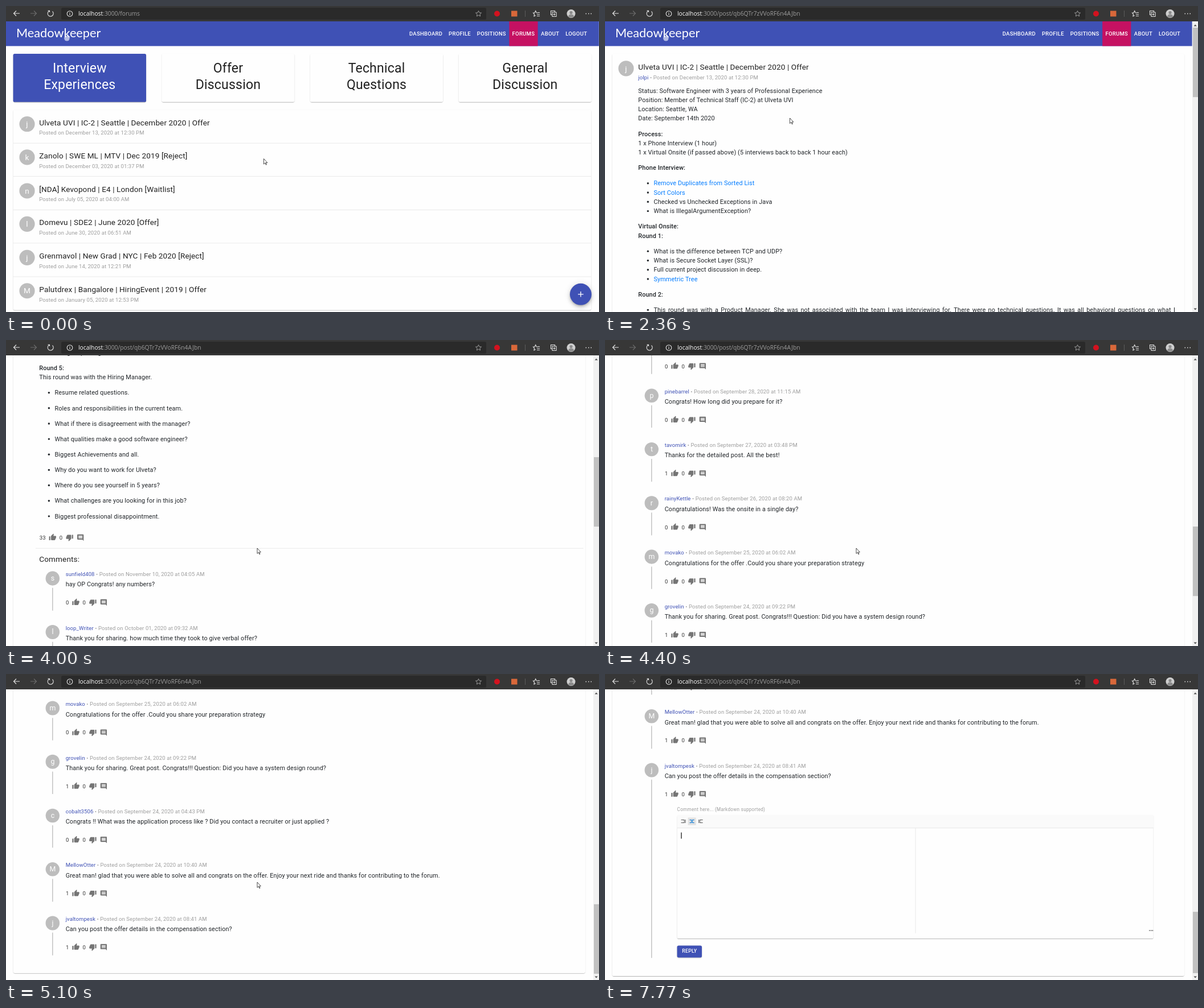
These frames come from a looping animation (1041x538 px, 8000 ms). An HTML page:

```html
<!DOCTYPE html>
<html lang="en">
<head>
<meta charset="utf-8">
<title>Forum walkthrough</title>
<style>
  html, body { margin: 0; width: 100%; height: 100%; overflow: hidden; background: #fefefe; }
  body { position: relative; font-family: Roboto, sans-serif; }
  #view { position: absolute; left: 0; top: 27px; width: 1041px; height: 511px; overflow: hidden; }
  /* The page is laid out 1535px wide and scaled down to the stage. */
  #page { position: absolute; left: -.6px; width: 1535px; transform-origin: 0 0; color: rgba(0,0,0,.87); }
  #chrome, #bar, #pointer { position: absolute; left: 0; top: 0; }
  .at { position: absolute; line-height: 24px; white-space: nowrap; }
  .card { position: absolute; background: #fefefe; border-radius: 4px;
    box-shadow: 0 2px 1px -1px rgba(0,0,0,.2), 0 1px 1px rgba(0,0,0,.14), 0 1px 3px rgba(0,0,0,.08); }
  .h6 { font-size: 20px; letter-spacing: .0075em; }
  .small { font-size: 14px; letter-spacing: .01071em; color: #9e9e9e; }
  .small b { font-weight: 400; color: #3f51b5; }
  .body { font-size: 16px; letter-spacing: .00938em; color: #212529; }
  .count { width: 17.5px; text-align: right; color: #333; }
  .avatar { position: absolute; border-radius: 50%; background: #bdbdbd; color: #fff; text-align: center; }
  .icon { position: absolute; width: 20px; height: 20px; fill: #757575; }
  .rule { position: absolute; height: 1px; background: #e0e0e0; }
  .thread { position: absolute; left: 120.7px; width: 2.4px; background: #bdbdbd; }

  nav { position: absolute; left: 0; top: 0; height: 64px; background: #3f51b5; color: #fff; }
  nav .menu { position: absolute; right: 22.4px; top: 0; display: flex; }
  nav .menu span { padding: 0 8px; line-height: 64px; font-size: 14px; font-weight: 500; letter-spacing: .02857em; }
  nav .menu .on { background: #c51162; }
  nav .mark { position: absolute; left: 152px; top: 37px; width: 14px; height: 14px; border-radius: 50%; background: #b4bce4; }
  nav .brand { position: absolute; left: 28px; top: 9px; font: 400 32px/40px Lato, sans-serif; }

  .topic { top: 84px; width: 344px; height: 125px; box-sizing: border-box; padding-top: 16px;
    font-size: 34px; line-height: 42px; letter-spacing: .00735em; text-align: center; }
  .topic.on { background: #3f51b5; color: #fff; }
  .fab { position: absolute; left: 1460.4px; top: 679px; width: 56px; height: 56px; border-radius: 50%; background: #3f51b5;
    box-shadow: 0 3px 5px -1px rgba(0,0,0,.2), 0 6px 10px rgba(0,0,0,.14), 0 1px 18px rgba(0,0,0,.12); }
  .fab svg { position: absolute; left: 16px; top: 16px; fill: #fff; }

  #spinner { position: absolute; left: 692.5px; top: 339px; width: 150px; height: 150px; fill: none; stroke: #3f51b5; stroke-width: 3.6;
    animation: turn 1.4s linear calc(var(--spin) * -1ms) infinite paused; }
  #spinner circle { animation: dash 1.4s ease-in-out calc(var(--spin) * -1ms) infinite paused; }
  @keyframes turn { to { transform: rotate(360deg); } }
  @keyframes dash {
    0% { stroke-dasharray: 1 200; stroke-dashoffset: 0; }
    50% { stroke-dasharray: 100 200; stroke-dashoffset: -15; }
    100% { stroke-dasharray: 100 200; stroke-dashoffset: -125; }
  }

  #story { position: absolute; left: 87.4px; top: 168px; width: 1389px; line-height: 24px; text-align: justify; }
  #story p { margin: 0 0 16px; }
  #story ul { margin: 0 0 16px; padding-left: 40px; }
  #story b { font-weight: 500; }
  #story a { color: #007bff; }

  #editor .box { left: 188px; top: 2982px; width: 1232px; height: 320px; }
  #editor .tools { position: absolute; left: 0; top: 0; width: 100%; height: 34px; box-sizing: border-box;
    background: #fafafa; border-bottom: 1px solid #ddd; }
  #editor .split { position: absolute; left: 616px; top: 34px; width: 1px; height: 272px; background: #ddd; }
  #editor .label { font-size: 12px; letter-spacing: .0333em; color: #9e9e9e; }
  #editor .reply { position: absolute; left: 188px; top: 3320px; width: 64px; line-height: 30.5px; border-radius: 4px; text-align: center;
    background: #3f51b5; color: #fff; font-size: 13px; font-weight: 500; letter-spacing: .02857em;
    box-shadow: 0 1px 3px rgba(0,0,0,.25); }
  #caret { position: absolute; left: 10.2px; top: 44.5px; width: 1.5px; height: 16px; background: #222; }
  #url { font: 10.3px "Open Sans", "Noto Sans", sans-serif; fill: #9d9d9d; }
</style>
</head>
<body>
<div id="view"><div id="page">
  <nav>
    <i class="mark"></i><span class="brand">Meadowkeeper</span>
    <div class="menu"><span>DASHBOARD</span><span>PROFILE</span><span>POSITIONS</span><span class="on">FORUMS</span><span>ABOUT</span><span>LOGOUT</span></div>
  </nav>
  <section id="forum"></section>
  <svg id="spinner" viewBox="22 22 44 44"><circle cx="44" cy="44" r="20.2"/></svg>
  <article id="post">
    <div id="sheet" class="card" style="left:20px;top:84px;width:1480px"></div>
    <div id="story" class="body">
      <p>Status: Software Engineer with 3 years of Professional Experience<br>Position: Member of Technical Staff (IC-2) at Ulveta UVI<br>Location: Seattle, WA<br>Date: September 14th 2020</p>
      <p><b>Process:</b><br>1 x Phone Interview (1 hour)<br>1 x Virtual Onsite (if passed above) (5 interviews back to back 1 hour each)</p>
      <p><b>Phone Interview:</b></p>
      <ul><li><a>Remove Duplicates from Sorted List</a></li><li><a>Sort Colors</a></li><li>Checked vs Unchecked Exceptions in Java</li><li>What is IllegalArgumentException?</li></ul>
      <p><b>Virtual Onsite:</b><br><b>Round 1:</b></p>
      <ul><li>What is the difference between TCP and UDP?</li><li>What is Secure Socket Layer (SSL)?</li><li>Full current project discussion in deep.</li><li><a>Symmetric Tree</a></li></ul>
      <p><b>Round 2:</b></p>
      <ul><li>This round was with a Product Manager. She was not associated with the team I was interviewing for. There were no technical questions. It was all behavioral questions on what I performed&nbsp;at&nbsp;my previous and current workplaces.</li></ul>
      <p><b>Round 3:</b></p>
      <ul><li>What is the difference between a process and a thread?</li><li>How does a hash map work?</li><li><a>Merge Intervals</a></li></ul>
      <p><b>Round 4:</b></p>
      <ul><li>Discussion about the past projects.</li><li><a>Valid Parentheses</a></li><li>Design a parking lot.</li></ul>
      <p><b>Round 5:</b><br>This round was with the Hiring Manager.</p>
      <ul id="last"></ul>
    </div>
    <div id="thread"></div>
    <div id="editor">
      <div class="at label" style="left:188px;top:2956px">Comment here... (Markdown supported)</div>
      <div class="card box">
        <div class="tools"></div><div class="split"></div>
        <svg style="position:absolute;left:0;top:0" width="88.5" height="34" viewBox="0 0 60 23" fill="none" stroke="#555">
          <path fill="#e2e2e2" stroke="none" d="M19 4.500h14v13H19z"/>
          <path d="M7 8.500h5.500v5H7M14.500 8v6M38 8v6M45 8.500h-5v5h5"/>
          <path stroke="#0078d7" d="M22 8.500h3v5h-3M30 8.500h-3v5h3"/>
        </svg>
        <div id="caret"></div>
        <svg style="position:absolute;left:1220px;top:297px" width="12" height="4" fill="#333"><path d="M1 1h2v2H1zM5 1h2v2H5zM9 1h2v2H9z"/></svg>
      </div>
      <div class="reply">REPLY</div>
    </div>
  </article>
</div></div>

<svg id="bar" width="1041" height="538">
  <path fill="#f1f1f1" d="M1031 27h10v511h-10z"/>
  <path fill="#505050" d="M1033.500 35.500l2.700-3 2.700 3zM1033.500 531.500l2.700 3 2.700-3z"/>
  <rect id="thumb" x="1032" width="9" fill="#c1c1c1"/>
</svg>

<svg id="chrome" width="1041" height="27" fill="none" stroke="#e4e4e4" stroke-width="1.1">
  <path fill="#373737" stroke="none" d="M0 0h1041v27H0z"/>
  <rect x="97" y="3" width="746" height="21" rx="2.500" fill="#2a2a2a" stroke="none"/>
  <path d="M24 13H13.500M18 8.500L13.500 13l4.500 4.500"/>
  <path stroke="#6c6c6c" d="M43 13h10.500M49 8.500l4.500 4.500-4.500 4.500"/>
  <path d="M81.500 9.500A5 5 0 1 1 76 8.700M73.500 8.200H76.500V11"/>
  <circle cx="112" cy="13.500" r="4.800"/><path d="M112 12.500v3.500M112 10.500v1"/>
  <text id="url" x="127" y="17.200" stroke="none"><tspan fill="#fff">localhost</tspan><tspan id="path"></tspan></text>
  <path stroke="#a8a8a8" stroke-width=".9" d="M829.500 8.500l1.500 3.200 3.500.4-2.600 2.400.7 3.500-3.100-1.800-3.100 1.800.7-3.500-2.600-2.400 3.500-.4z"/>
  <circle cx="862" cy="13.500" r="5" fill="#d3121f" stroke="none"/>
  <path fill="#d9683a" stroke="none" d="M887 8.500h10.500v10H887z"/>
  <path stroke="#5a5a5a" d="M911.500 8v11"/>
  <path d="M933 12l-1.800-.2-1.500-3.200-1.500 3.200-2.700.4 2 2.200-.5 3.500 2.700-1.500M933 11.500h4M932 14.500h5M932 17.500h5"/>
  <path d="M958.500 15.500h-2v-7h7v2M959 11h7v7.500h-7zM962.500 12.700v4M960.500 14.700h4"/>
  <circle cx="992" cy="13.500" r="7.500" fill="#cfcfcf" stroke="none"/>
  <path fill="#8b8b8b" stroke="none" d="M987 18.500a5 4 0 0 1 10 0 7.500 7.500 0 0 1-10 0z"/><circle cx="992" cy="11.500" r="2.600" fill="#8b8b8b" stroke="none"/>
  <path stroke-width="1.500" d="M1017.500 13.500h1.500M1022 13.500h1.500M1026.500 13.500h1.500"/>
</svg>

<svg id="pointer" width="1041" height="538"><g id="arrow">
  <circle id="press" cx=".5" cy="0" r="8.300" fill="#ff0" fill-opacity=".47"/>
  <path fill="#fff" stroke="#222" stroke-width=".8" d="M0 0V9.500L2.300 7.400 3.800 10.800 5 10.300 3.600 7H6.400Z"/>
</g></svg>

<script>
const $ = id => document.getElementById(id);
const SCALE = .6787, LOOP = 8000, VIEW = 511;

// Page building
const at = (x, y, cls, html) => `<div class="at ${cls}" style="left:${x}px;top:${y - 12}px">${html}</div>`;
const avatar = (x, y, d, letter) =>
  `<div class="avatar" style="left:${x - d / 2}px;top:${y - d / 2}px;width:${d}px;height:${d}px;font-size:${d / 2}px;line-height:${d}px">${letter}</div>`;
const rule = (x, y, w) => `<div class="rule" style="left:${x}px;top:${y}px;width:${w}px"></div>`;
const THUMB = "M1 21h4V9H1v12zm22-11c0-1.100-.9-2-2-2h-6.310l.95-4.570.03-.32c0-.41-.17-.79-.44-1.060L14.170 1 7.590 7.590C7.220 7.950 7 8.450 7 9v10c0 1.100.9 2 2 2h9c.83 0 1.540-.5 1.840-1.220l3.020-7.050c.09-.23.14-.47.14-.73v-2z";
const NOTE = "M22 4c0-1.100-.9-2-2-2H4c-1.100 0-2 .9-2 2v12c0 1.100.9 2 2 2h14l4 4zM18 14H6v-2h12zm0-3H6V9h12zm0-3H6V6h12z";
const icon = (x, y, d, turn = 0) =>
  `<svg class="icon" viewBox="0 0 24 24" style="left:${x - 10}px;top:${y - 10}px;transform:rotate(${turn}deg)"><path d="${d}"/></svg>`;
const actions = (x, y, likes) =>
  at(x, y, "small count", likes) + icon(x + 35.7, y - 1, THUMB) +
  at(x + 53, y, "small", '<span style="color:#333">0</span>') + icon(x + 79.7, y, THUMB, 180) + icon(x + 107.5, y, NOTE);

const topics = ["Interview<br>Experiences", "Offer<br>Discussion", "Technical<br>Questions", "General<br>Discussion"];
const posts = [
  ["j", "Ulveta UVI | IC-2 | Seattle | December 2020 | Offer", "December 13, 2020 at 12:30 PM"],
  ["k", "Zanolo | SWE ML | MTV | Dec 2019 [Reject]", "December 03, 2020 at 01:37 PM"],
  ["n", "[NDA] Kevopond | E4 | London [Waitlist]", "July 05, 2020 at 04:00 AM"],
  ["l", "Domevu | SDE2 | June 2020 [Offer]", "June 30, 2020 at 06:51 AM"],
  ["j", "Grenmavol | New Grad | NYC | Feb 2020 [Reject]", "June 14, 2020 at 12:21 PM"],
  ["M", "Palutdrex | Bangalore | HiringEvent | 2019 | Offer", "January 05, 2020 at 12:53 PM"]
];
const ROW = 86.5, TEXT_X = 87.4;
$("forum").innerHTML =
  topics.map((t, i) => `<div class="card topic ${i ? "" : "on"}" style="left:${20 + 384 * i}px">${t}</div>`).join("") +
  `<div class="card" style="left:20px;top:229px;width:1495px;height:${6 * ROW}px"></div>` +
  posts.map(([letter, title, date], i) => {
    const y = 229 + ROW * i;
    return avatar(56, y + 36.5, 40, letter) + at(TEXT_X, y + 32.8, "h6", title) +
      at(TEXT_X, y + 59.2, "small", "Posted on " + date) + (i < 5 ? rule(20, y + ROW - 1, 1495) : "");
  }).join("") +
  '<div class="fab"><svg width="24" height="24"><path d="M19 13h-6v6h-2v-6H5v-2h6V5h2v6h6z"/></svg></div>';

$("last").innerHTML = ["Resume related questions.", "Roles and responsibilities in the current team.",
  "What if there is disagreement with the manager?", "What qualities make a good software engineer?",
  "Biggest Achievements and all.", "Why do you want to work for Ulveta?", "Where do you see yourself in 5 years?",
  "What challenges are you looking for in this job?", "Biggest professional disappointment."
].map(s => `<li><p>${s}</p></li>`).join("");

const comments = [
  ["sunfield408", "November 10, 2020 at 04:05 AM", "hay OP Congrats! any numbers?", 0],
  ["loop_Writer", "October 01, 2020 at 09:32 AM", "Thank you for sharing. how much time they took to give verbal offer?", 0],
  ["pinebarrel", "September 28, 2020 at 11:15 AM", "Congrats! How long did you prepare for it?", 0],
  ["tavomirk", "September 27, 2020 at 03:48 PM", "Thanks for the detailed post. All the best!", 1],
  ["rainyKettle", "September 26, 2020 at 08:20 AM", "Congratulations! Was the onsite in a single day?", 0],
  ["movako", "September 25, 2020 at 06:02 AM", "Congratulations for the offer .Could you share your preparation strategy", 0],
  ["grovelin", "September 24, 2020 at 09:22 PM", "Thank you for sharing. Great post. Congrats!!! Question: Did you have a system design round?", 1],
  ["cobalt3506", "September 24, 2020 at 04:43 PM", "Congrats !! What was the application process like ? Did you contact a recruiter or just applied ?", 0],
  ["MellowOtter", "September 24, 2020 at 10:40 AM", "Great man! glad that you were able to solve all and congrats on the offer. Enjoy your next ride and thanks for contributing to the forum.", 1],
  ["jvaltompesk", "September 24, 2020 at 08:41 AM", "Can you post the offer details in the compensation section?", 1]
];
const byline = (name, date) => `<b>${name}</b> • Posted on ${date}`;
$("thread").innerHTML =
  avatar(56, 122, 40, "j") + at(TEXT_X, 118.2, "h6", posts[0][1]) + at(TEXT_X, 144.7, "small", byline("jolpi", posts[0][2])) +
  actions(86.7, 1506.7, 33) + rule(77.5, 1533.6, 1417) + at(TEXT_X, 1563, "h6", "Comments:") +
  comments.map(([name, date, text, likes], i) => {
    const y = 1601.3 + 139.24 * i;
    return avatar(122.2, y + 11, 36.5, name[0]) +
      `<div class="thread" style="top:${y + 36}px;height:58.5px"></div>` +
      at(155.7, y, "small", byline(name, date)) + at(155.7, y + 27, "body", text) + actions(146.7, y + 74, likes);
  }).join("");
const lastThread = [...document.querySelectorAll(".thread")].pop();

const bursts = [[470, 730, 4], [1260], [1490, 2290, 11], [2360], [2900, 3140, 4], [3380, 4000, 9], [4080, 4160, 2],
  [4240, 4710, 7], [4790, 5020, 4], [5100], [5250, 6040, 11], [6430], [6670, 6750, 2], [7130, 7590, 7], [7770]];
const ticks = bursts.flatMap(([a, b = a, n = 1]) => Array.from({ length: n }, (_, i) => a + (b - a) * i / Math.max(1, n - 1)));
const hold = t => ticks.reduce((last, x) => x <= t + .5 ? x : last, 0);

const pointerPath = [[383, 452.5, 268.5], [643, 327, 193.3], [730, 324.5, 197], [2820, 324.5, 197], [3140, 441, 366],
  [5170, 441, 366], [6040, 173.5, 476], [7050, 173.5, 476], [7590, 431, 548]];
const scrollPath = [[3300, 0], [3380, 45.2], [4000, 702.3], [4620, 1500], [4710, 1575.4], [4790, 1562], [4870, 1546],
  [4950, 1538.5], [5020, 1535.2], [5100, 1533.8], [6669, 1533.8], [6670, 1802.8]];
const smooth = p => p * p * (3 - 2 * p);
function follow(path, t, ease = p => p) {
  const i = path.findIndex(k => k[0] > t);
  if (i < 0) return path[path.length - 1].slice(1);
  if (!i) return path[0].slice(1);
  const a = path[i - 1], b = path[i], p = ease((t - a[0]) / (b[0] - a[0]));
  return a.slice(1).map((v, j) => v + (b[j + 1] - v) * p);
}
const show = (id, on) => $(id).style.display = on ? "" : "none";

function draw(t) {
  const loading = t >= 1490 && t < 2360, reading = t >= 2360, editing = t >= 6670;
  show("forum", t < 1490);
  show("spinner", loading);
  show("post", reading);
  show("bar", reading);
  show("editor", editing);
  show("caret", t >= 6750 && (t < 7240 || t >= 7770));
  show("press", t >= 1260 && t < 1490 || t >= 6430 && t < 6670);
  $("path").textContent = ":3000/" + (t < 1490 ? "forums" : "post/qb6QTr7zVVoRF6n4AJbn");
  document.querySelector("nav").style.width = (reading ? 1520 : 1535) + "px";
  $("spinner").style.setProperty("--spin", Math.max(0, t - 1512));

  const bottom = editing ? 3399 : 2995;
  $("sheet").style.height = bottom - 84 + "px";
  lastThread.style.height = (editing ? 462 : 58.5) + "px";

  const [scroll] = follow(scrollPath, t);
  $("page").style.transform = `translateY(${-scroll}px) scale(${SCALE})`;
  const full = (bottom + 18) * SCALE, size = 489 * VIEW / full;
  $("thumb").setAttribute("height", size);
  $("thumb").setAttribute("y", 38 + Math.min(1, scroll / (full - VIEW)) * (489 - size));

  const [x, y] = follow(pointerPath, t, smooth);
  $("arrow").setAttribute("transform", `translate(${x} ${y})`);
}

let shown = -1;
const start = performance.now();
function frame() {
  const t = hold((performance.now() - start) % LOOP);
  if (t !== shown) draw(shown = t);
  requestAnimationFrame(frame);
}
frame();
</script>
</body>
</html>
```
